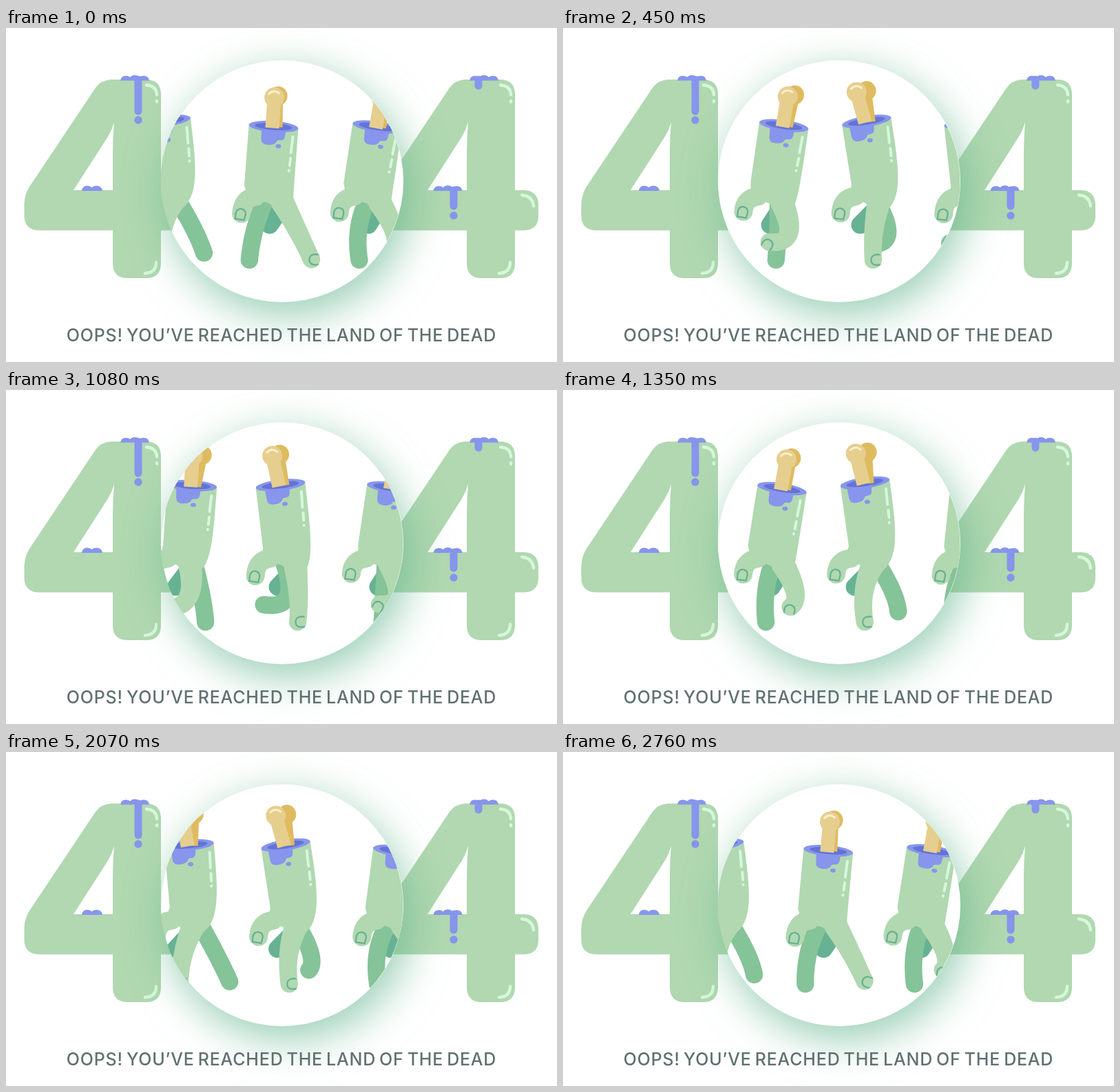
Write an HTML page with a canvas that moves like this. It is 800 px wide and 486 px high and loops after 2.79 s.

```html
<!DOCTYPE html>
<html lang="en">
<head>
<meta charset="utf-8">
<title>404</title>
<style>
  html, body { margin: 0; width: 100%; height: 100%; overflow: hidden; background: #fff; }
  #stage { position: relative; width: 800px; height: 486px; overflow: hidden; }
  svg, canvas { position: absolute; left: 0; top: 0; }
  #hole {
    position: absolute; left: 224.5px; top: 47px; width: 352px; height: 352px;
    border-radius: 50%; background: #fff;
    box-shadow: 9px 20px 60px rgba(82, 172, 132, .54), 0 0 60px rgba(176, 220, 180, .2);
  }
  #line {
    position: absolute; left: 0; width: 800px; top: 431px; margin: 0;
    text-align: center; white-space: nowrap; color: #617070;
    font: 500 25px/32px Montserrat, Inter, sans-serif;
    letter-spacing: .8px; word-spacing: -2.4px;
  }
  .skin { fill: #b1d8b1; }
  .goo { fill: #8795ec; }
  .drip { stroke: #8795ec; stroke-width: 11; stroke-linecap: round; }
  .shine { fill: none; stroke: #d6f7da; stroke-width: 4.5; stroke-linecap: round; }
</style>
</head>
<body>
<div id="stage">
  <svg width="800" height="486" viewBox="0 0 800 486">
    <defs>
      <g id="four">
        <path class="skin" fill-rule="evenodd" d="M152 75Q138 76 130 87L34 231Q26.500 243 26.500 258V273Q26.500 294.500 49 294.500H155V342Q155 364 177 364H203Q225 364 225 342V294.500H237Q259 294.500 259 273V258Q259 236 237 236H225V97Q225 75 203 75ZM98 236L148 158Q154 148 157 137Q155 160 155 182V236Z"/>
        <path class="shine" d="M204 83Q218 84 219 97M219 106V107.5M202 357Q218 356 218 341"/>
      </g>
      <path id="bumps" class="goo" d="M0 8Q1 1 8 1Q12 1 14 3Q17 0 21 0Q25 0 28 3Q30 1 34 1Q41 1 42 8Z"/>
    </defs>
    <use href="#four"/>
    <use href="#four" x="514"/>
    <path class="shine" d="M749 243Q764 244 766 259"/>
    <use href="#bumps" x="166" y="68.500"/>
    <path class="drip" d="M192 75V121"/>
    <circle class="goo" cx="192" cy="134" r="5.700"/>
    <path class="goo" d="M110 237Q111 229.500 118 229.500Q122 229.500 124.500 232Q127 229.500 131 229.500Q139 229.500 140 237Z"/>
    <use href="#bumps" x="673" y="68.500"/>
    <path class="drip" d="M686 75V84"/>
    <use href="#bumps" x="620.500" y="229"/>
    <path class="drip" d="M650 236V259"/>
    <circle class="goo" cx="650" cy="273" r="5.700"/>
  </svg>
  <div id="hole"></div>
  <canvas id="walk" width="800" height="486"></canvas>
  <p id="line">OOPS! YOU’VE REACHED THE LAND OF THE DEAD</p>
</div>
<script>
const c = document.getElementById('walk').getContext('2d');
const TAU = Math.PI * 2;
const STEP = 30, STEPS = 93, STRIDES = 2, WRAP = 429;
const SKIN = '#b1d8b1', BACK = '#85c398', PAD = '#67b293', GOO = '#8795ec', SHINE = '#d6f7da';

// cosine over one stride that peaks at the given phase
const wave = (phase, peak, rate = 1) => Math.cos(TAU * rate * (phase - peak));

// planted finger slides back, then curls up and swings forward
function stride(x, phase) {
  const lift = Math.max(0, wave(phase, .755));
  return {
    top: x + 53 + 10 * wave(phase, .03),
    kneeX: x + 57 + 28 * wave(phase, .99),
    kneeY: 298 + 5 * wave(phase, .66, 2),
    tipX: x + 52 + 43 * wave(phase, .045) + 12.5 * wave(phase, .963, 2),
    tipY: 337.5 - 26 * lift,
    nail: 125 * lift
  };
}

function fill(path, color) {
  c.fillStyle = color;
  c.fill(new Path2D(path));
}

function stroke(path, color, width, cap = 'round') {
  c.strokeStyle = color;
  c.lineWidth = width;
  c.lineCap = cap;
  c.lineJoin = 'round';
  c.stroke(new Path2D(path));
}

function oval(x, y, rx, ry, color) {
  c.fillStyle = color;
  c.beginPath();
  c.ellipse(x, y, rx, ry, 0, 0, TAU);
  c.fill();
}

// tapered curve that passes through the knee halfway
function finger(f, base, color) {
  const cx = 2 * f.kneeX - (f.top + f.tipX) / 2;
  const cy = 2 * f.kneeY - (254 + f.tipY) / 2;
  c.fillStyle = color;
  c.beginPath();
  for (let i = 0; i <= 40; i++) {
    const t = i / 40, s = 1 - t;
    const x = s * s * f.top + 2 * s * t * cx + t * t * f.tipX;
    const y = s * s * 254 + 2 * s * t * cy + t * t * f.tipY;
    const r = 12.7 + (base - 12.7) * s * s;
    c.moveTo(x + r, y);
    c.arc(x, y, r, 0, TAU);
  }
  c.fill();
}

function local(x, y, angle, draw) {
  c.save();
  c.translate(x, y);
  c.rotate(angle * Math.PI / 180);
  draw();
  c.restore();
}

function bone(x, y, lean, phase) {
  const side = 11.5 - 6 * wave(phase, .98);
  const kx = x + lean, ky = y - 42.5;
  const dark = '#dfbb60', light = '#e6ce8f';
  stroke(`M${x + 4} ${y + 1}L${kx + side - 2} ${ky}`, dark, 18, 'butt');
  oval(kx + side, ky - 2, 13.5, 14, dark);
  stroke(`M${x - 2} ${y + 2}L${kx} ${ky}`, light, 20, 'butt');
  oval(kx, ky, 14.5, 14.5, light);
  stroke(`M${kx - 8} ${ky - 5}Q${kx - 1} ${ky - 12} ${kx + 7} ${ky - 6}`, '#fbefc8', 3);
}

function hand(x, phase) {
  const sway = wave(phase, .83), tilt = 9 * sway;
  const cx = x + 44 + 11.5 * sway, cy = 139.5 + 4.5 * wave(phase, .92);
  const tx = x - 5 + 6.3 * wave(phase, .03), ty = 269.5 + 2.3 * wave(phase, .13);
  const pad = x + 31 + 13 * wave(phase, .97);
  const near = stride(x, phase), far = stride(x - 7.5, phase + .5);
  const a = tilt * Math.PI / 180, co = Math.cos(a), si = Math.sin(a);
  const arm = (u, v) => `${cx + u * co - v * si} ${cy + u * si + v * co}`;

  stroke(`M${near.top + 1} 258L${pad} 286.500`, PAD, 26);
  finger(far, 13, BACK);

  fill(`M${arm(-36, 0)}L${arm(-36, 88)}L${tx + 12} 250L${tx + 14} 264` +
    `Q${(tx + near.top) / 2 + 2} 242 ${near.top - 11} 263L${near.top + 15} 262` +
    `C${arm(36, 112)} ${arm(36, 65)} ${arm(36, 0)}Z`, SKIN);
  stroke(`M${tx + 23} 245Q${tx + 3} 247 ${tx + 1.5} ${ty - 1}`, SKIN, 27);
  finger(near, 17, SKIN);

  local(tx, ty, 4, () =>
    stroke('M-7 7L-6.500 -2Q-5 -8 1 -8Q8 -7 7.500 0L6 8Z', PAD, 2.3));
  local(near.tipX, near.tipY, near.nail, () => {
    c.beginPath();
    c.arc(0, 0, 12.7, 0, TAU);
    c.clip();
    stroke('M12 -8L3 -7.500Q-3 -6 -3 0T3 7.500L12 7', PAD, 2.3);
  });

  // severed end
  local(cx, cy, tilt, () => {
    oval(0, 0, 36, 8, GOO);
    oval(0, 0, 27, 5, '#6474d5');
    stroke('M29 13L28 36M28 44L27.500 55M27 62V62.500', SHINE, 4);
    c.translate(5 * wave(phase, .93) - 5, 0);
    fill('M-17 4L-16 19Q-16 27 -6 27Q5 27 7 20Q9 19 13 19Q18 18 18 12L19 4Q0 10 -17 4Z', GOO);
    oval(9.5, 28, 4, 3, GOO);
  });
  bone(cx, cy, 10.5 * sway - 4, phase);
}

function frame(now) {
  const turn = Math.floor(now / STEP) % STEPS / STEPS;
  c.clearRect(0, 0, 800, 486);
  c.save();
  c.beginPath();
  c.arc(400.5, 223, 176, 0, TAU);
  c.clip();
  for (let i = 0; i < 3; i++) {
    for (let lap = -1; lap < 2; lap++) {
      const x = 55 + 142 * i + WRAP * (lap + turn);
      if (x > 60 && x < 640) hand(x, .88 - .44 * i + STRIDES * turn);
    }
  }
  c.restore();
}

const began = performance.now();
function tick() {
  frame(performance.now() - began);
  requestAnimationFrame(tick);
}
tick();
</script>
</body>
</html>
```
